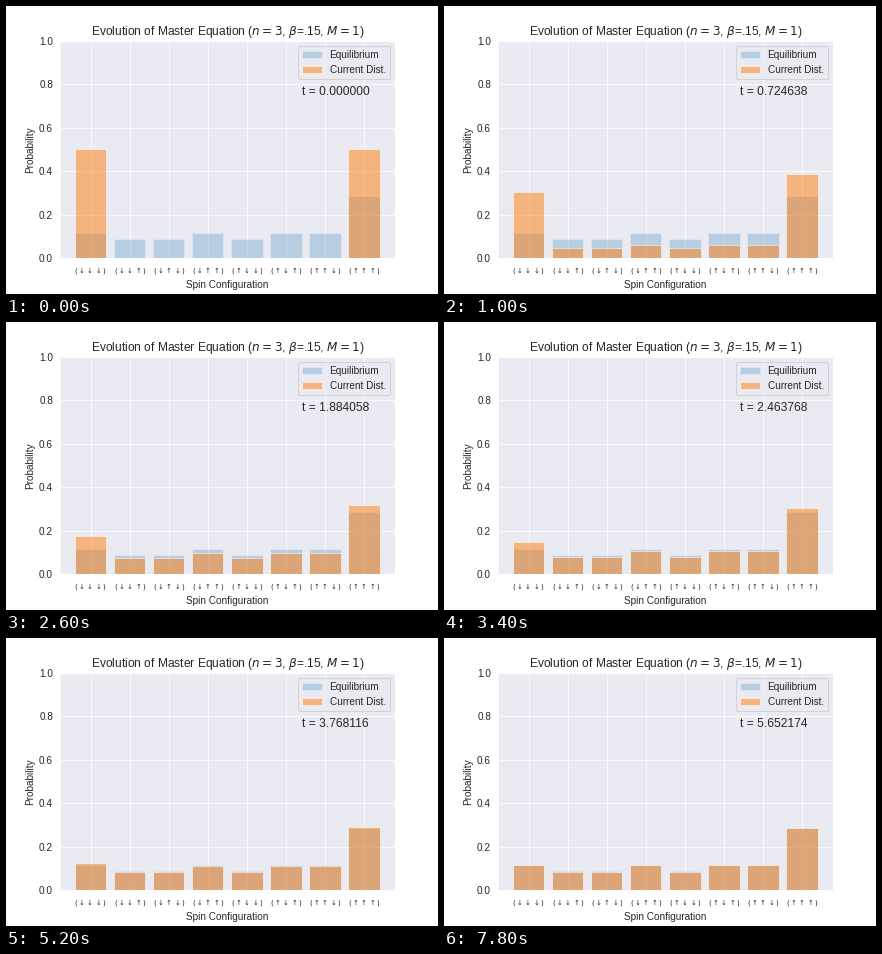
Write a matplotlib script that moves like this. It is 432x288 px and loops after 8000 ms.

```python
import itertools
import numpy as np
import matplotlib.pyplot as plt
from matplotlib.animation import FuncAnimation

N_SPINS, BETA, FIELD = 3, 0.15, 1
FRAMES, INTERVAL = 40, 200
DT = 10 / 69

plt.rcParams.update({
    "font.family": "Liberation Sans",
    "mathtext.fontset": "dejavusans",
    "text.color": ".15",
    "axes.labelcolor": ".15",
    "xtick.color": ".15",
    "ytick.color": ".15",
    "axes.facecolor": "#EAEAF2",
    "axes.edgecolor": "white",
    "axes.axisbelow": True,
    "axes.grid": True,
    "grid.color": "white",
    "grid.linestyle": "-",
    "xtick.bottom": False,
    "ytick.left": False,
    "patch.edgecolor": "w",
    "patch.force_edgecolor": True,
})

# Boltzmann distribution of a periodic Ising ring
spins = np.array(list(itertools.product([-1, 1], repeat=N_SPINS)))
bonds = (spins * np.roll(spins, 1, axis=1)).sum(axis=1)
weights = np.exp(BETA * (bonds + FIELD * spins.sum(axis=1)))
equilibrium = weights / weights.sum()

start = np.zeros(len(spins))
start[[0, -1]] = 0.5


def distribution(t):
    return equilibrium + (start - equilibrium) * np.exp(-t)


def spin_label(config):
    arrows = " ".join(r"\uparrow" if s > 0 else r"\downarrow" for s in config)
    return f"$({arrows})$"


fig, ax = plt.subplots(figsize=(6, 4), dpi=72)
fig.subplots_adjust(left=0.125, right=0.9, bottom=0.125, top=0.88)

x = np.arange(len(spins))
ax.bar(x, equilibrium, color="#1f77b4", alpha=0.25, label="Equilibrium")
bars = ax.bar(x, start, color="#ff7f0e", alpha=0.5, label="Current Dist.")
clock = ax.text(5.4, 0.75, "", fontsize=12)

ax.set_xlim(-0.79, 7.79)
ax.set_ylim(0, 1)
ax.set_xticks(x, [spin_label(c) for c in spins], fontsize=7)
ax.set_xlabel("Spin Configuration")
ax.set_ylabel("Probability")
ax.set_title(r"Evolution of Master Equation ($n=3$, $\beta$=.15, $M=1$)")
ax.legend(loc="upper right")


def update(frame):
    t = frame * DT
    for bar, height in zip(bars, distribution(t)):
        bar.set_height(height)
    clock.set_text(f"t = {t:.6f}")
    return [*bars, clock]


anim = FuncAnimation(fig, update, frames=FRAMES, interval=INTERVAL,
                     repeat=True, repeat_delay=0)
plt.show()
```
